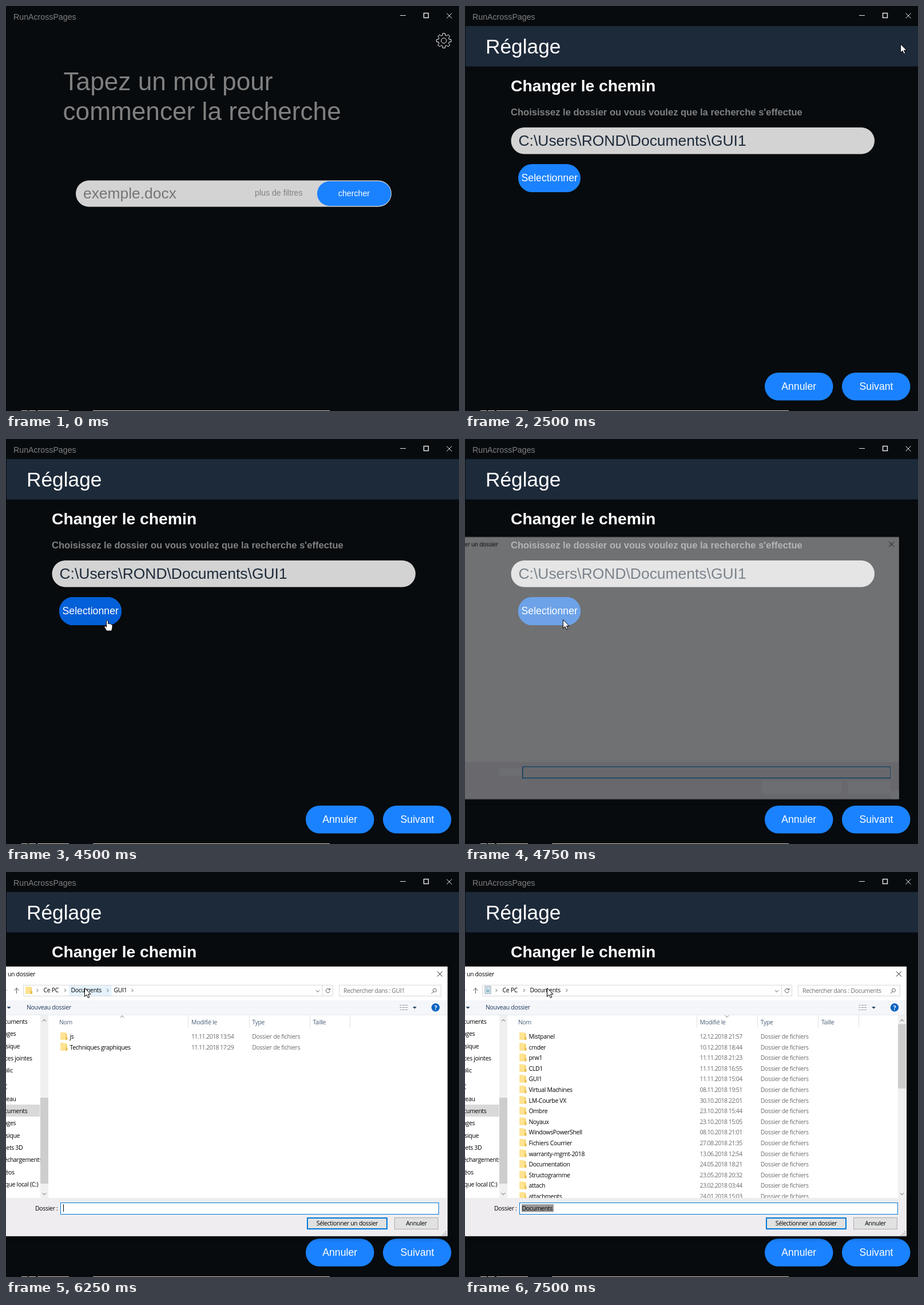
Recreate the animation shown at these times as an HTML page. Size 792 px wide and 707 px high, loop 8 s.

```html
<!DOCTYPE html>
<html lang="fr">
<head>
<meta charset="utf-8">
<title>Recherche de fichiers</title>
<style>
html, body { margin: 0; width: 100%; height: 100%; overflow: hidden; background: #070b0e; }
svg { display: block; width: 792px; height: 707px; font-family: "Liberation Sans", Arial, sans-serif; }
text { white-space: pre; }
.s { font-size: 14.2px; fill: #808080; }
.w { fill: #fff; }
.btn { font-size: 17.7px; fill: #fff; text-anchor: middle; }
.line { fill: none; stroke-width: 1; }
#dialog text { font: 10.5px "Open Sans", "Noto Sans", sans-serif; letter-spacing: -.32px; }
#dialog .date { letter-spacing: -.56px; }
#dialog .grey { fill: #6d6d6d; }
#dialog .head { fill: #4c607a; }

/* everything switches in 250 ms steps: 3.125% each */
#home, #settings, .hover, .dlg, .first, .body, .ready, .gui, .docs, .blank,
.row1, .row2, .crumb, #arrow, #hand, #cursor { animation: 8s step-end infinite; }
#home { animation-name: home; }
#settings { animation-name: settings; }
.hover { animation-name: hover; }
#dialog { animation-name: dialog; transform-origin: 290px 382px; }
.blank { animation-name: blank; }
.body { animation-name: body; }
.first { animation-name: first; }
.ready { animation-name: ready; }
.gui { animation-name: gui; }
.docs { animation-name: docs; }
.row1 { animation-name: row1; }
.row2 { animation-name: row2; }
.crumb { animation-name: crumb; }
#arrow { animation-name: arrow; }
#hand { animation-name: hand; }
#cursor { animation-name: cursor; }
@keyframes home { 0% { opacity: 1 } 28.125%, 100% { opacity: 0 } }
@keyframes settings { 0% { opacity: 0 } 28.125%, 100% { opacity: 1 } }
@keyframes hover { 0% { opacity: 0 } 53.125% { opacity: 1 } 62.5%, 100% { opacity: 0 } }
@keyframes dialog {
  0% { opacity: 0; transform: scale(.9725) }
  59.375% { opacity: .42; transform: scale(.9725) }
  62.5%, 100% { opacity: 1; transform: none }
}
@keyframes blank { 0% { opacity: 1 } 62.5%, 100% { opacity: 0 } }
@keyframes body { 0% { opacity: 0 } 62.5%, 100% { opacity: 1 } }
@keyframes first { 0% { opacity: 0 } 62.5% { opacity: 1 } 65.625%, 100% { opacity: 0 } }
@keyframes ready { 0% { opacity: 0 } 65.625%, 100% { opacity: 1 } }
@keyframes gui { 0% { opacity: 0 } 62.5% { opacity: 1 } 87.5%, 100% { opacity: 0 } }
@keyframes docs { 0% { opacity: 0 } 87.5%, 100% { opacity: 1 } }
@keyframes row2 { 0% { opacity: 0 } 62.5% { opacity: 1 } 71.875%, 100% { opacity: 0 } }
@keyframes row1 { 0% { opacity: 0 } 71.875% { opacity: 1 } 75%, 100% { opacity: 0 } }
@keyframes crumb { 0% { opacity: 0 } 78.125% { opacity: 1 } 87.5%, 100% { opacity: 0 } }
@keyframes arrow { 0% { opacity: 1 } 21.875% { opacity: 0 } 28.125% { opacity: 1 } 53.125% { opacity: 0 } 59.375%, 100% { opacity: 1 } }
@keyframes hand { 0% { opacity: 0 } 21.875% { opacity: 1 } 28.125% { opacity: 0 } 53.125% { opacity: 1 } 59.375%, 100% { opacity: 0 } }
@keyframes cursor {
  0% { transform: translate(-50px, -50px) }
  6.25% { transform: translate(361px, 452px) }
  9.375% { transform: translate(440px, 392px) }
  12.5% { transform: translate(540px, 285px) }
  15.625% { transform: translate(660px, 160px) }
  18.75% { transform: translate(744px, 75px) }
  21.875% { transform: translate(764px, 65px) }
  28.125% { transform: translate(761px, 66px) }
  34.375% { transform: translate(690px, 120px) }
  37.5% { transform: translate(470px, 290px) }
  40.625% { transform: translate(286px, 423px) }
  43.75% { transform: translate(262px, 396px) }
  46.875% { transform: translate(236px, 370px) }
  50% { transform: translate(212px, 346px) }
  53.125% { transform: translate(184px, 318px) }
  56.25% { transform: translate(177px, 316px) }
  59.375% { transform: translate(171px, 315px) }
  71.875% { transform: translate(168px, 290px) }
  75% { transform: translate(152px, 236px) }
  78.125% { transform: translate(137px, 202px) }
  81.25% { transform: translate(140px, 203px) }
  84.375%, 100% { transform: translate(143px, 202px) }
}
</style>
</head>
<body>
<svg viewBox="0 0 792 707">
<defs>
  <path id="chev" class="line" d="M-3-1.6L0 1.6L3-1.6" stroke-width="1.3"/>
  <path id="tri" d="M-3.5-1.8h7L0 1.8z"/>
  <g id="folder">
    <path d="M0 1h5l1 1.5h5V14H0z" fill="#f3d068"/>
    <path d="M0 1h8.500V14H0z" fill="#ffe391"/>
    <path d="M9 9h3v5H9z" fill="#e9bd55"/>
  </g>
  <path id="pin" d="M1-4L4-1L2.500-.5L.5 1.500L0 3.500L-1.500 2L-4 4.500L-2.200 1.200L-3.500 0L-1.500-.5L.5-2.500z" fill="#8a949c"/>
  <clipPath id="sideClip"><path d="M-20 250H59.500V569H-20z"/></clipPath>
  <clipPath id="pinClip"><path d="M-20 250H46V569H-20z"/></clipPath>
  <clipPath id="listClip"><path d="M75 250H757V569H75z"/></clipPath>
  <filter id="shadow" x="-10%" y="-10%" width="120%" height="120%">
    <feDropShadow dx="0" dy="3" stdDeviation="4" flood-opacity=".45"/>
  </filter>
</defs>

<rect width="792" height="707" fill="#070b0e"/>
<path d="M27 706h11v1h-11zm13 0h12v1h-12zm15 0h11v1h-11zm11 0h44v1h-44zm86 0h414v1h-414z" fill="#d9cfc5"/>
<text class="s" x="13" y="24">RunAcrossPages</text>
<g class="line" stroke="#e4e4e4" stroke-width="1.3">
  <path d="M689 16.500h10M770.500 12.500l9 9m0-9l-9 9"/>
  <path d="M730.500 12.500h8v8h-8z" stroke-width="1.500"/>
</g>

<g id="home">
  <g id="gear" class="line" stroke="#fff" stroke-width="1.200" transform="translate(765.500 60.500)"><circle r="4.600"/></g>
  <g font-size="44.200" fill="#808080"><text x="100.500" y="147">Tapez un mot pour</text><text x="99.500" y="199">commencer la recherche</text></g>
  <rect x="122" y="304.500" width="552" height="46" rx="23" fill="#d3d3d3"/>
  <text x="135" y="336" font-size="26.400" fill="#757575">exemple.docx</text>
  <text class="s" x="435" y="331">plus de filtres</text>
  <rect x="544" y="306" width="129" height="43" rx="21.500" fill="#1b82ff"/>
  <text class="s w" x="580.800" y="332">chercher</text>
</g>

<g id="settings">
  <rect x="1" y="35" width="791" height="70.500" fill="#1d2a3a"/>
  <text class="w" x="36" y="82.500" font-size="35.300">Réglage</text>
  <g font-weight="bold">
    <text class="w" x="80" y="149" font-size="28.300">Changer le chemin</text>
    <text x="80" y="191" font-size="16.560" fill="#808080">Choisissez le dossier ou vous voulez que la recherche s'effectue</text>
  </g>
  <rect x="80.500" y="212" width="635.500" height="46.500" rx="23.200" fill="#d3d3d3"/>
  <text x="93.500" y="244" font-size="26.450" fill="#1d2a3a">C:\Users\ROND\Documents\GUI1</text>
  <g fill="#1b82ff">
    <rect x="93" y="276" width="109" height="49" rx="24.400"/>
    <rect class="hover" x="93" y="276" width="109" height="49" rx="24.400" fill="#0460d8"/>
    <rect x="524" y="640" width="119.500" height="48.500" rx="24.200"/>
    <rect x="659" y="640" width="119.500" height="48.500" rx="24.200"/>
  </g>
  <text class="btn" x="147.700" y="306">Selectionner</text>
  <text class="btn" x="583.700" y="669.700">Annuler</text>
  <text class="btn" x="719" y="669.700">Suivant</text>
</g>

<g id="dialog" class="dlg">
  <rect x="-192" y="165" width="964" height="470.500" fill="#fff" filter="url(#shadow)"/>
  <rect x="-192" y="569" width="964" height="66.500" fill="#f0edf0"/>
  <text x="51" y="182" text-anchor="end">Sélectionner un dossier</text>
  <path class="line" stroke="#111" stroke-width="1.200" d="M754 173.500l9 9m0-9l-9 9"/>
  <path class="blank" fill="#f8f8fa" d="M53 580h40v13h-40zM526 603h143v23h-143zM680 603h76v23h-76zM757 621h15v14h-15z"/>
  <rect x="95.500" y="577.500" width="661" height="20" fill="#f0edf0" stroke="#0078d7"/>

  <g class="body">
    <!-- address bar -->
    <g class="line" stroke="#d9d9d9"><path d="M30.500 197.500h541v19h-541zM553.500 197v19M582.500 197.500h178v19h-178z"/></g>
    <g class="line" stroke="#555" stroke-width="1.300">
      <path d="M18.500 212v-9m-4 4l4-4.500l4 4.500"/>
      <path d="M566 205.200a3.600 3.600 0 1 0 .5 2.800M566.500 203v2.800h-2.800"/>
      <circle cx="749.500" cy="206.500" r="3"/><path d="M747.300 208.800l-3.500 3.500"/>
      <use href="#chev" x="545" y="208"/>
    </g>
    <use href="#chev" x="-1" y="207" stroke="#999"/>
    <rect class="crumb" x="110" y="198" width="74.500" height="18" fill="#e5f3fe"/>
    <g id="crumbs"></g>
    <g class="gui">
      <use href="#folder" x="34" y="199"/>
      <text x="188.500" y="210">GUI1</text>
      <text class="grey" x="590" y="210.500">Rechercher dans : GUI1</text>
    </g>
    <g class="docs">
      <path d="M35 199.500h10v13h-10z" fill="#eef5f8" stroke="#7d98a6"/>
      <path class="line" stroke="#4a86a5" d="M37 202.500h3m1.500 0h2M37 205.500h6M37 207.500h6M37 209.500h6"/>
      <text class="grey" x="590" y="210.500">Rechercher dans : Documents</text>
    </g>

    <!-- toolbar -->
    <rect x="-192" y="224" width="964" height="26" fill="#f5f6fa"/>
    <path class="line" stroke="#e6e8ee" d="M0 249.500H772"/>
    <circle cx="751" cy="236.500" r="7.200" fill="#0a63c2"/>
    <text x="751" y="240.500" text-anchor="middle" fill="#fff" style="font-weight:bold">?</text>
    <g class="ready">
      <use href="#tri" x="5" y="237" fill="#1e395b"/><use href="#tri" x="714.500" y="237" fill="#1e395b"/>
      <text x="36" y="240" fill="#1e395b">Nouveau dossier</text>
      <path class="line" stroke="#8b95a1" stroke-width="2" stroke-dasharray="3 1.500 4 1 4 20" d="M688.500 232.500h15M688.500 236.500h15M688.500 240.500h15"/>
    </g>

    <!-- side tree -->
    <g class="first" id="tree1"></g>
    <g class="ready">
      <rect x="0" y="406" width="59.500" height="21" fill="#d9d9d9"/>
      <g id="tree2"></g>
    </g>
    <rect x="60" y="250" width="14" height="319" fill="#f0f0f0"/>
    <rect class="first" x="60" y="313" width="14" height="208" fill="#cdcdcd"/>
    <rect class="ready" x="60" y="394" width="14" height="150" fill="#cdcdcd"/>
    <g stroke="#505050">
      <use href="#chev" transform="translate(67 259) scale(1 -1)"/><use href="#chev" x="67" y="562"/>
    </g>

    <!-- file lists -->
    <g clip-path="url(#listClip)">
      <text class="head" x="93" y="265.500">Nom</text>
      <g class="gui">
        <use href="#chev" transform="translate(203 252.500) scale(1 -1)" stroke="#777"/>
        <rect class="row1" x="90" y="278" width="508" height="18.500" fill="#e5f3fe"/>
        <rect class="row2" x="90" y="297" width="508" height="18.500" fill="#e5f3fe"/>
        <g id="guiList"></g>
      </g>
      <g class="docs">
        <use href="#chev" x="458" y="252" stroke="#777"/>
        <g id="docsList"></g>
      </g>
    </g>
    <g class="docs">
      <rect x="757" y="250" width="14" height="319" fill="#f0f0f0"/>
      <rect x="757" y="265.500" width="14" height="112.500" fill="#cdcdcd"/>
      <g stroke="#505050"><use href="#chev" transform="translate(764 259) scale(1 -1)"/><use href="#chev" x="764" y="562"/></g>
    </g>

    <!-- footer -->
    <text x="51" y="591">Dossier :</text>
    <rect x="95.500" y="577.500" width="661" height="20" fill="#fff" stroke="#0078d7"/>
    <path class="gui line" stroke="#000" d="M100.500 580v13"/>
    <g class="docs"><rect x="99" y="580" width="56" height="13.500" fill="#999"/><text x="99.500" y="590.500">Documents</text></g>
    <rect x="527" y="604" width="139" height="19" fill="#e1e1e1" stroke="#0078d7" stroke-width="2"/>
    <rect x="679.500" y="603.500" width="76" height="20" fill="#e1e1e1" stroke="#adadad"/>
    <text x="596.500" y="617" text-anchor="middle">Sélectionner un dossier</text>
    <text x="717.500" y="617" text-anchor="middle">Annuler</text>
    <path fill="#b5b5b5" d="M768 627h2v2h-2zM768 630h2v2h-2zM765 630h2v2h-2zM768 633h2v2h-2zM765 633h2v2h-2zM762 633h2v2h-2z"/>
  </g>
</g>

<g id="cursor">
  <path id="arrow" d="M.5.5V15.500L4 12.300L6.400 17.600L8.800 16.500L6.500 11.300H11z" fill="#fff" stroke="#000" stroke-linejoin="round"/>
  <path id="hand" d="M-1.500 1.500Q0-.5 1.500 1.500V6.500Q3.200 5 4.300 7Q6 5.800 7 7.800Q9 7.200 9 9.500V14L7.500 19H-1.200L-4.800 12.500Q-5.500 10-3.500 10.300L-1.500 12.200z" fill="#fff" stroke="#000" stroke-linejoin="round"/>
</g>
</svg>

<script>
const $ = id => document.getElementById(id);
const text = (x, y, s, cls = '') => `<text class="${cls}" x="${x}" y="${y}">${s}</text>`;
const icon = (id, x, y) => `<use href="#${id}" x="${x}" y="${y}"/>`;
const next = (x, cls = '') => `<path class="line ${cls}" stroke="#555" stroke-width="1.2" d="M${x - 1.5} 204l2.700 2.700l-2.700 2.700"/>`;

// gear outline: eight teeth
const teeth = [];
for (let i = 0; i < 8; i++) {
  for (const [da, r] of [[-.25, 9.6], [-.17, 12.9], [.17, 12.9], [.25, 9.6]]) {
    const a = i * Math.PI / 4 + da;
    teeth.push((r * Math.cos(a)).toFixed(2) + ',' + (r * Math.sin(a)).toFixed(2));
  }
}
$('gear').innerHTML += `<polygon points="${teeth.join(' ')}" stroke-linejoin="round"/>`;

$('crumbs').innerHTML = next(55) + text(65.5, 210, 'Ce PC') + next(103.5) +
  text(113.5, 210, 'Documents') + next(178) + `<g class="ready"><g class="gui">${next(221)}</g></g>`;

// an item starting with * opens a new, less indented group
function tree(names, pins = 0) {
  let y = 265 - 21.3;
  const items = names.split('|').map((name, i) => {
    const root = name[0] === '*';
    y += root ? 28.3 : 21.3;
    const label = text(root ? -24.5 : -16, y.toFixed(1), name.replace('*', ''));
    return i < pins ? `<g clip-path="url(#pinClip)">${label}</g>${icon('pin', 52, y - 4)}` : label;
  });
  return `<g clip-path="url(#sideClip)">${items.join('')}</g>`;
}
const shared = 'Documents|Images|Musique|Pièces jointes|Public|*Ce PC';
$('tree1').innerHTML = '<rect x="0" y="562" width="59.5" height="7" fill="#d9d9d9"/>' +
  tree('Documents|Images|Disque local (C:)|Grand_Plan_pr|CLD1|GUI1|Images|Articles|*MonDrive|' + shared.replace('*', ''), 4);
$('tree2').innerHTML = tree(shared + '|Bureau|Documents|Images|Musique|Objets 3D|Téléchargements|Vidéos|Disque local (C:)');

function list(x, rows) {
  const heads = ['Modifié le', 'Type', 'Taille'].map((s, i) => text(x + i * 106.2, 265.5, s, 'head'));
  const rules = [-6, 100.5, 206.5, 277].map(d => `M${Math.round(x + d) + .5} 250v22`).join('');
  return heads.join('') + `<path class="line" stroke="#e2e2e2" d="${rules}"/>` +
    rows.split('|').map((row, i) => {
      const [name, date] = row.split('=');
      const y = +(291 + i * 18.6).toFixed(1);
      return icon('folder', 95.5, y - 12) + text(111.5, y, name) +
        text(x, y, date, 'grey date') + text(x + 106.2, y, 'Dossier de fichiers', 'grey');
    }).join('');
}
$('guiList').innerHTML = list(324, 'js=11.11.2018 13:54|Techniques graphiques=11.11.2018 17:29');
$('docsList').innerHTML = list(410.5, [
  'Mistpanel=12.12.2018 21:57', 'cmder=10.12.2018 18:44', 'prw1=11.11.2018 21:23',
  'CLD1=11.11.2018 16:55', 'GUI1=11.11.2018 15:04', 'Virtual Machines=08.11.2018 19:51',
  'LM-Courbe VX=30.10.2018 22:01', 'Ombre=23.10.2018 15:44', 'Noyaux=23.10.2018 15:05',
  'WindowsPowerShell=08.10.2018 21:01', 'Fichiers Courrier=27.08.2018 21:35',
  'warranty-mgmt-2018=13.06.2018 12:54', 'Documentation=24.05.2018 18:21',
  'Structogramme=23.05.2018 20:32', 'attach=23.02.2018 03:44', 'attachments=24.01.2018 15:03'
].join('|'));
</script>
</body>
</html>
```
